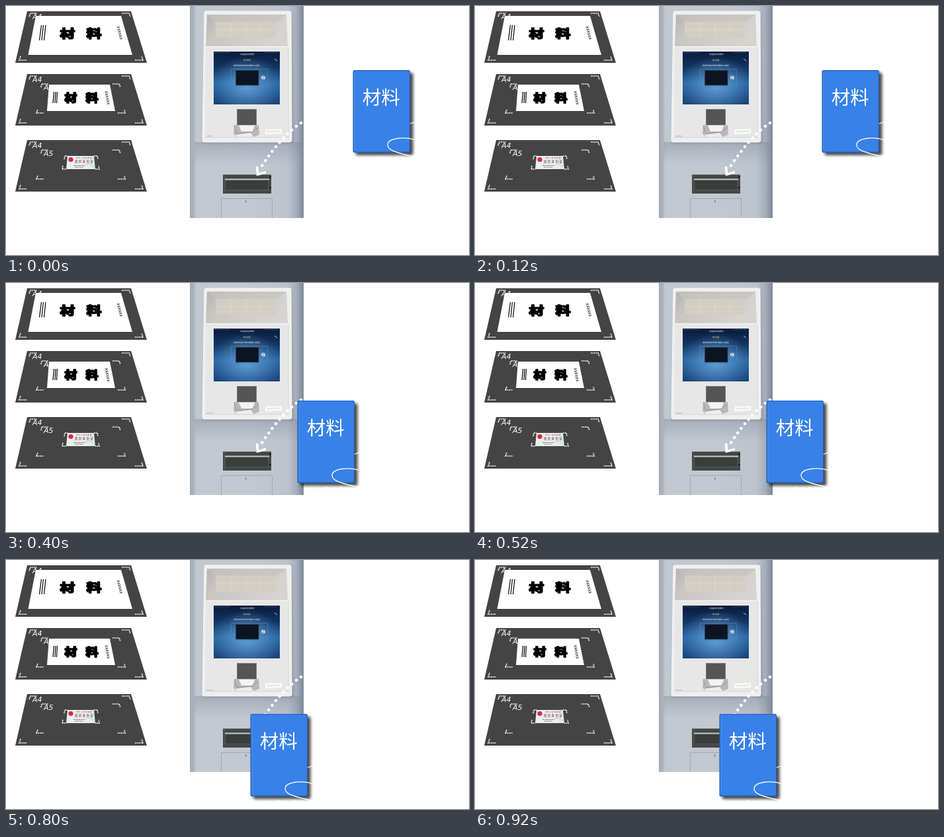
Write an HTML page that moves like this. It is 700 px wide and 377 px high and loops after 1 s.

```html
<!DOCTYPE html>
<html lang="zh">
<head>
<meta charset="utf-8">
<title>材料</title>
<style>
html, body { margin: 0; width: 100%; height: 100%; overflow: hidden; background: #fff; }
svg { display: block; width: 700px; height: 377px; }
text { font-family: "Noto Sans CJK SC", "Noto Sans CJK", sans-serif; }
.size { font: italic 11px "DejaVu Sans", sans-serif; fill: #fff; }
.dots { fill: none; stroke: #fff; stroke-width: 1.7; stroke-dasharray: 1.7 .9; }
.fat { font-weight: 700; stroke: #000; stroke-width: 2.2; stroke-linejoin: round; text-anchor: middle; }
.ink { fill: none; stroke: #000; stroke-width: 1.2; }
.mini { font-size: 2.7px; fill: #fff; text-anchor: middle; }
.line { fill: none; stroke: #fff; stroke-width: 1.3; stroke-linecap: round; }
#doc { animation: move 1s step-end infinite; }
@keyframes move {
  0% { transform: translate(524.5px, 97px); }
  20% { transform: translate(519px, 121px); }
  40% { transform: translate(440.5px, 178px); }
  60% { transform: translate(410.5px, 207px); }
  80% { transform: translate(369.5px, 233px); }
}
</style>
</head>
<body>
<svg viewBox="0 0 700 377">
  <defs>
    <linearGradient id="body">
      <stop offset="0" stop-color="#a4aab5"/><stop offset=".035" stop-color="#adb3bd"/>
      <stop offset=".055" stop-color="#c3c8d0"/><stop offset=".5" stop-color="#c3c8d1"/>
      <stop offset=".86" stop-color="#bdc3cd"/><stop offset=".94" stop-color="#a4acba"/>
      <stop offset="1" stop-color="#7e8799"/>
    </linearGradient>
    <linearGradient id="under" x2="0" y2="1">
      <stop offset="0" stop-color="#7f8796" stop-opacity=".4"/><stop offset="1" stop-color="#7f8796" stop-opacity="0"/>
    </linearGradient>
    <linearGradient id="niche" x2="1" y2=".4">
      <stop offset="0" stop-color="#b3b2af"/><stop offset=".3" stop-color="#c8c6c1"/><stop offset="1" stop-color="#d6d4d0"/>
    </linearGradient>
    <linearGradient id="screen" x2="0" y2="1">
      <stop offset="0" stop-color="#0a1a3a"/><stop offset=".3" stop-color="#123562"/>
      <stop offset=".6" stop-color="#25629f"/><stop offset="1" stop-color="#1a4377"/>
    </linearGradient>
    <radialGradient id="glow" cy=".64" r=".55">
      <stop offset="0" stop-color="#6fb0e6" stop-opacity=".8"/><stop offset="1" stop-color="#6fb0e6" stop-opacity="0"/>
    </radialGradient>
    <linearGradient id="idcard">
      <stop offset="0" stop-color="#e6f0f0"/><stop offset=".6" stop-color="#f2eeee"/><stop offset="1" stop-color="#d8eaea"/>
    </linearGradient>
    <filter id="shade" x="-20%" y="-20%" width="150%" height="150%">
      <feGaussianBlur stdDeviation="2.2"/>
    </filter>
    <g id="mat">
      <path d="M32 0H189L213 78H14Z" fill="#444"/>
      <path class="dots" d="M35 8L37 3H47M175 3H186L188 8M22 68L20 74H32M195 74H207L205 68"/>
      <text class="size" x="40" y="11.500">A4</text>
    </g>
    <g id="a5">
      <path class="dots" d="M53 20L54 15H64M161 15H171L173 20M48 54L46 59H57M169 59H180L179 54"/>
      <text class="size" x="57" y="24">A5</text>
    </g>
  </defs>

  <use href="#mat" y="8"/>
  <path d="M45 15H174L191 74H33.500Z" fill="#fff"/>
  <path class="ink" d="M53.500 29L50.500 52M56.500 29L54 52M60 29L57.500 52"/>
  <g class="fat" font-size="23" transform="translate(0 48) scale(1 .75)">
    <text x="93" y="0">材</text><text x="133" y="0">料</text>
  </g>
  <text transform="translate(167.500 31) rotate(76)" font-size="7">xxxxxx</text>

  <g transform="translate(0 103)">
    <use href="#mat"/><use href="#a5"/>
    <path d="M65 16H157L165 56H62Z" fill="#fff"/>
    <path class="ink" d="M72.500 27L71 44M75 27L74 44M77.500 27L76.500 44"/>
    <g class="fat" font-size="19" transform="translate(0 42) scale(1 .82)">
      <text x="98" y="0">材</text><text x="130" y="0">料</text>
    </g>
    <text transform="translate(149.500 26) rotate(80)" font-size="7">xxxxxx</text>
  </g>

  <g transform="translate(0 203)">
    <use href="#mat"/><use href="#a5"/>
    <path d="M93 24H133L135 44H91Z" fill="url(#idcard)"/>
    <path class="dots" d="M88 29L89 24H93M133 24H138L139 29M86 39L85 44H91M135 44H141L140 39"/>
    <circle cx="98" cy="29.500" r="3.600" fill="#d8283c"/>
    <text x="118" y="28" font-size="2.800" letter-spacing=".7" fill="#733" text-anchor="middle">中华人民共和国</text>
    <text x="118.500" y="33.500" font-size="4.600" letter-spacing="1.200" font-weight="500" fill="#5e2c33" text-anchor="middle">居民身份证</text>
    <path d="M102 38.500H119M104 41H117" stroke="#666" stroke-width=".8" stroke-dasharray="3 .6"/>
    <path d="M119 39Q126 33 132 40" fill="none" stroke="#b9c9cc"/>
  </g>

  <!-- kiosk -->
  <path d="M278 0H450V321H278Z" fill="url(#body)"/>
  <path d="M285 206H446V240H285Z" fill="url(#under)"/>
  <path d="M303 11H431L434 207H298Z" fill="#5f6879" opacity=".6" filter="url(#shade)"/>
  <path d="M302 8H429Q431 8 431 11L432 203Q432 206 429 206H299Q297 206 297 203L300 11Q300 8 302 8Z" fill="#efefef" stroke="#fafafa"/>
  <path d="M304 13H424L426 62H302Z" fill="url(#niche)"/>
  <path d="M304 13L317 24H410L424 13Z" fill="#c6c4c0" opacity=".7"/>
  <path d="M317 24H408V48H317Z" fill="#d2cec3"/>
  <path d="M317 36H408M340 24V48M363 24V48M386 24V48" stroke="#dedbd1" stroke-width=".8"/>
  <path d="M302 61H426L427 199H301Z" fill="#e7e7e8"/>
  <path d="M302 61.500H426" stroke="#f8f8f8"/>
  <path d="M427 62V199H301" fill="none" stroke="#d2d3d7"/>
  <path d="M303 197H313" stroke="#b4b6bc"/>

  <path d="M314 69H414V149H314Z" fill="url(#screen)"/>
  <path d="M314 69H414V149H314Z" fill="url(#glow)"/>
  <path d="M316 70.500H340M390 70.500H411" stroke="#47678e" stroke-width=".8" stroke-dasharray="3 1"/>
  <text class="mini" x="365" y="73.500">欢迎使用自助服务</text>
  <text class="mini" x="364" y="82.500" style="fill:#f1dc70">材料放置</text>
  <text class="mini" x="364" y="90.500">请将您的证件材料平整放入扫描区</text>
  <path d="M406 80L410 83" stroke="#b9cde0"/>
  <path d="M340.500 95.500H395.500V122.500H340.500Z" fill="none" stroke="#4f83b5" stroke-width=".7"/>
  <path d="M347.500 97.500H382V120H347.500Z" fill="#0b1420" stroke="#29435f"/>
  <circle cx="389" cy="108.500" r="3" fill="#d8dde2"/>
  <path d="M388 107H391M387 110H390" stroke="#456" stroke-width=".8"/>

  <path d="M349 156H379V180H349Z" fill="#555"/>
  <path d="M349.500 180V156.500H378.500V180" fill="none" stroke="#777"/>
  <path d="M345 180H382L383 195L375 198H348L344 193Z" fill="#b7b8ba"/>
  <path d="M352 181H376L373 190H356Z" fill="#f3f3f3"/>
  <path d="M345 181L349 193L371 191L382 184" fill="none" stroke="#94969a"/>
  <path d="M347 195L370 192L374 198H349Z" fill="#ededed"/>
  <path d="M391 186L418 185V194L391 195.500Z" fill="#f6f8f4" stroke="#d5d9d6" stroke-width=".6"/>
  <path d="M395 190.500L413 189.500" stroke="#c6d2cc" stroke-dasharray="3 1"/>

  <path d="M328 255H401V284H328Z" fill="#454747"/>
  <path d="M328 255.500H401" stroke="#686a6b"/>
  <path d="M331 261.500H398V263.500H331Z" fill="#c6c9c8"/>
  <path d="M333 264H396V278H333Z" fill="#3b3d3d"/>
  <path d="M333 278.500H397V264M330.500 256V283" fill="none" stroke="#565959"/>
  <path d="M398 259H401M398 275H401" stroke="#191b1b" stroke-width="2"/>
  <path d="M325.500 321V291.500H402.500V321" fill="none" stroke="#a4a8b2"/>
  <path d="M362.500 294V297H364" fill="none" stroke="#666b76"/>

  <path d="M446 177Q415 198 385 245" fill="none" stroke="#fff" stroke-width="4.600" stroke-linecap="round" stroke-dasharray="0 8.800"/>
  <path d="M379.500 243L380.500 255L393 251.500" fill="none" stroke="#fff" stroke-width="3.600"/>

  <g id="doc">
    <rect x="4" y="4" width="87" height="125" rx="3" fill="#000" opacity=".72" filter="url(#shade)"/>
    <rect width="86.500" height="125" rx="2.500" fill="#2860b5"/>
    <rect x="1.500" y="1" width="84" height="122.500" rx="2" fill="#3781e8"/>
    <path d="M2 1H84" stroke="#2d6fd0"/>
    <path d="M2.500 2V122" stroke="#5b9af0" opacity=".7"/>
    <text x="42.800" y="52" font-size="28.500" font-weight="300" fill="#fff" text-anchor="middle">材料</text>
    <path class="line" d="M87 81L94 78.500M95 106C78 100 53 103 52.500 113C53 123 68 125 95 132"/>
    <path class="line" d="M40 133L44 131M51 134L54 132M63 133L67 131M73 132L78 134"/>
  </g>
</svg>
</body>
</html>
```
